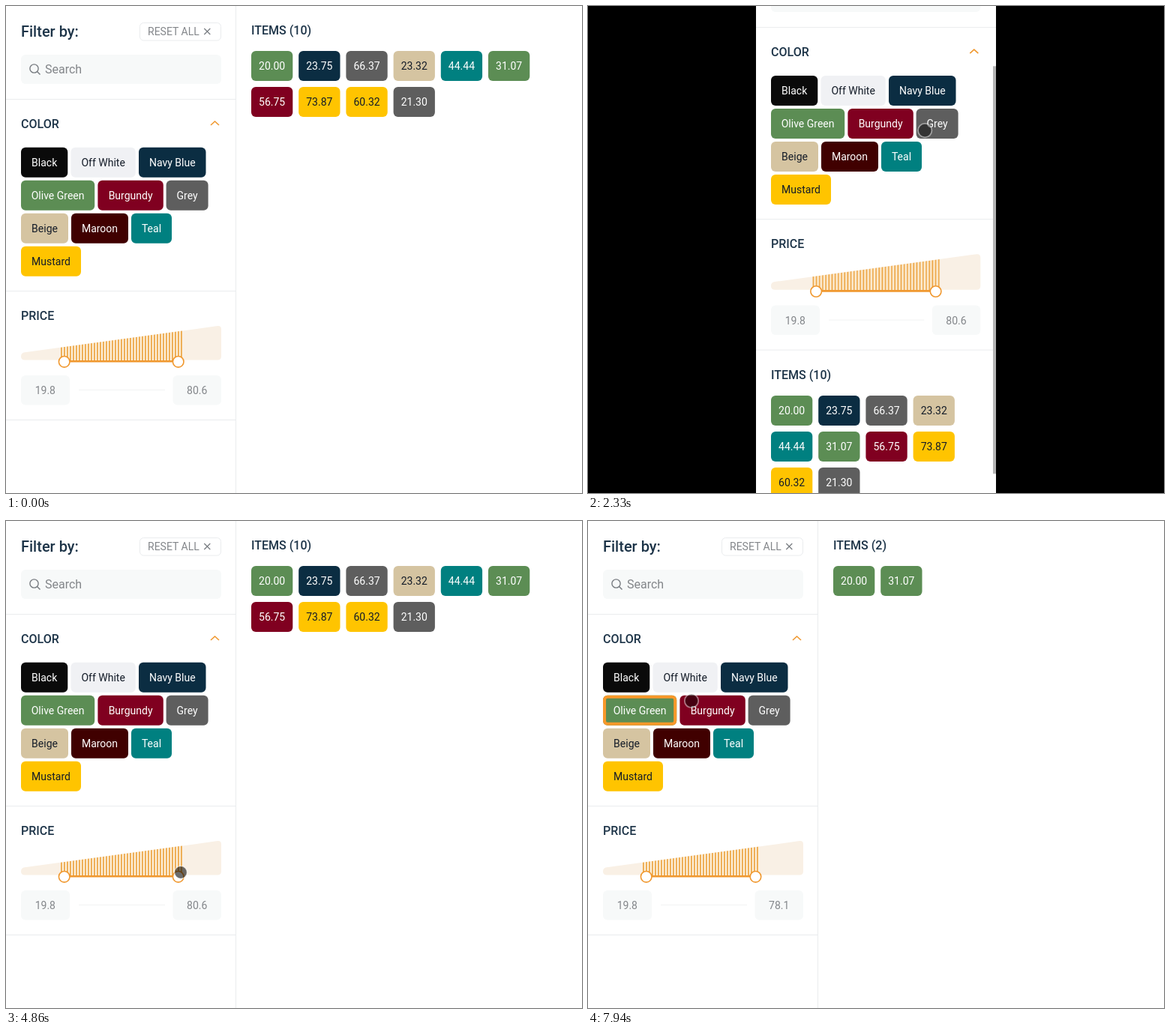
Write an HTML page that moves like this. It is 768 px wide and 650 px high and loops after 8000 ms.

```html
<!DOCTYPE html>
<html lang="en">
<head>
<meta charset="utf-8">
<title>Product filter</title>
<style>
html, body { margin: 0; width: 100%; height: 100%; overflow: hidden; background: #fff; }
svg { display: block; width: 100%; height: 100%; font: 14px Roboto, Arial, sans-serif; }
.head { font-size: 16px; font-weight: 500; fill: #1d3448; }
.title { font-size: 20px; font-weight: 500; fill: #1d3448; }
.soft { fill: #83868a; }
.mid { text-anchor: middle; }
</style>
</head>
<body>
<svg id="stage" viewBox="0 0 768 650">
  <defs>
    <pattern id="bars" width="4" height="50" patternUnits="userSpaceOnUse">
      <rect width="4" height="50" fill="#fdf0da"/>
      <rect x="1" width="1.8" height="50" fill="#eda94c"/>
    </pattern>
  </defs>
  <g id="page"></g>
  <g id="cursor"><circle r="9" fill="#000"/><circle r="9.2" fill="none" stroke="#fff" stroke-opacity=".45" stroke-width="1.8"/></g>
</svg>
<script>
const LOOP = 8000, LOW = 19.8, ORANGE = '#f0982f', RULE = '#eaecee', FIELD = '#f7f9f9';
const TO_MOBILE = 1420, TO_DESKTOP = 3450, GRAB = 5200, DROP = 6960, PICK = 7640;

const colors = {
  Black: '#0a0a0a', 'Off White': '#f0f1f4', 'Navy Blue': '#0b2d42', 'Olive Green': '#5c8d54',
  Burgundy: '#800020', Grey: '#5e5e5e', Beige: '#d5c4a1', Maroon: '#400000', Teal: '#008080', Mustard: '#ffc400'
};
const light = ['Off White', 'Beige', 'Mustard'];

// name, x offset, row, width
const chips = [
  ['Black', 0, 0, 62.3], ['Off White', 66.5, 0, 86.3], ['Navy Blue', 157, 0, 89.5],
  ['Olive Green', 0, 1, 98.2], ['Burgundy', 102.4, 1, 87.4], ['Grey', 193.6, 1, 56],
  ['Beige', 0, 2, 63], ['Maroon', 67, 2, 76], ['Teal', 147, 2, 54],
  ['Mustard', 0, 3, 80]
];

const items = [
  [20, 'Olive Green'], [23.75, 'Navy Blue'], [83.45, 'Mustard'], [66.37, 'Grey'], [23.32, 'Beige'],
  [44.44, 'Teal'], [31.07, 'Olive Green'], [83.42, 'Teal'], [56.75, 'Burgundy'], [73.87, 'Mustard'],
  [60.32, 'Mustard'], [21.3, 'Grey'], [84.9, 'Teal']
];

// time, x, y
const path = [
  [1180, 364, -14], [1290, 361, 2], [1420, 362, -14], [1650, 375, -14], [1880, 450, 260],
  [2140, 450, 262], [2420, 449, 136], [2560, 449, 136], [2800, 447, 270], [3010, 447, 270],
  [3250, 410, -14], [3600, 560, -14], [3840, 552, 97], [4670, 239, 437], [4780, 240, 438],
  [4860, 233, 469], [5040, 229.5, 474], [GRAB, 229.5, 474], [5510, 186, 470], [5620, 186, 470],
  [6390, 258.5, 464], [6560, 258.5, 464], [6920, 223.25, 468], [7000, 223.25, 468],
  [7260, 66, 274], [7370, 66, 274], [7440, 76, 261], [7680, 76, 261], [7920, 138, 240]
];
const scroll = [[2140, 0], [2420, 126], [2560, 126], [2790, 0]];

function sample(keys, t) {
  const n = keys.findIndex(k => k[0] > t);
  if (n < 0) return keys[keys.length - 1].slice(1);
  if (n === 0) return keys[0].slice(1);
  const a = keys[n - 1], b = keys[n];
  let p = (t - a[0]) / (b[0] - a[0]);
  p = p * p * (3 - 2 * p);
  return a.slice(1).map((v, i) => v + (b[i + 1] - v) * p);
}

const rect = (x, y, w, h, fill, extra = '') =>
  `<rect x="${x}" y="${y}" width="${w}" height="${h}" fill="${fill}" ${extra}/>`;
const text = (x, y, s, cls = '', extra = '') =>
  `<text x="${x}" y="${y}" class="${cls}" ${extra}>${s}</text>`;
const line = (d, color, width) =>
  `<path d="${d}" fill="none" stroke="${color}" stroke-width="${width}"/>`;

function tag(x, y, w, label, name) {
  return rect(x, y, w, 40, colors[name], 'rx="6"') +
    text(x + w / 2, y + 25, label, 'mid', `fill="${light.includes(name) ? '#141c28' : '#fff'}"`);
}

function slider(x, w, high) {
  const k = w / 267, step = (w - 17) / 100, bottom = 426.5 + 46 * k;
  const at = v => x + 8.2 + v * step;
  const a = 2.67 * LOW, b = 2.67 * high, top = v => 36.5 - v * .137;
  const y = bottom + 2.3;
  const knob = v => `<circle cx="${at(v)}" cy="${y}" r="7.3" fill="#fff" stroke="${ORANGE}" stroke-width="1.6"/>`;
  return `<g transform="translate(${x} 426.5) scale(${k})">
    <path d="M0 41Q0 36.5 5 35.8L262 .6Q267 0 267 5V41Q267 46 262 46H5Q0 46 0 41Z" fill="#f9f0e5"/>
    <path d="M${a} 47V${top(a)}L${b} ${top(b)}V47Z" fill="url(#bars)"/></g>` +
    line(`M${at(LOW)} ${y - .6}H${at(high)}`, ORANGE, 2.6) + knob(LOW) + knob(high);
}

function filters(x, w, edge, shift, high, picked) {
  const r = x + w, left = x - 20;
  let s = text(x, 41, 'Filter by:', 'title') +
    rect(r - 108.5, 22.5, 108, 23.5, '#fff', `rx="5" stroke="${RULE}"`) +
    text(r - 98, 39, 'RESET ALL', 'soft') +
    line(`M${r - 22.7} 30l8 8m0-8l-8 8`, '#777b80', 1.2) +
    rect(x, 65, w, 39, FIELD, 'rx="6"') +
    `<circle cx="${x + 17.5}" cy="83.5" r="5.6" fill="none" stroke="#777b80" stroke-width="1.4"/>` +
    line(`M${x + 21.5} 87.5l4 4`, '#777b80', 1.4) +
    text(x + 32, 89.7, 'Search', 'soft', 'font-size="16"') +
    text(x, 162.5, 'COLOR', 'head') +
    line(`M${r - 14} 159l5.5-5 5.5 5`, ORANGE, 1.6);
  for (const y of [124.5, 380.5, 552.5 + shift]) s += line(`M${left} ${y}H${edge}`, RULE, 1);
  for (const [name, dx, row, cw] of chips) {
    const cy = 188.8 + row * 44;
    s += tag(x + dx, cy, cw, name, name);
    if (name === picked)
      s += rect(x + dx + 2, cy + 2, cw - 4, 36, 'none', 'rx="4" stroke="#f8982a" stroke-width="4"');
  }
  const fy = 493 + shift;
  return s + text(x, 419, 'PRICE', 'head') + slider(x, w, high) +
    rect(x, fy, 65, 39.5, FIELD, 'rx="6"') + rect(r - 64.5, fy, 64.5, 39.5, FIELD, 'rx="6"') +
    line(`M${x + 77} ${fy + 19.5}H${r - 75}`, '#f2f3f3', 1) +
    text(x + 32.3, fy + 25, LOW.toFixed(1), 'soft mid') +
    text(r - 32.3, fy + 25, high.toFixed(1), 'soft mid');
}

function results(x, y, cols, high, picked) {
  const list = items.filter(([v, c]) => v <= high && (!picked || c === picked));
  return text(x, y, `ITEMS (${list.length})`, 'head') + list.map(([v, c], i) =>
    tag(x + i % cols * 63.2, y + 22.3 + Math.floor(i / cols) * 48, 55.3, v.toFixed(2), c)).join('');
}

const page = document.getElementById('page'), cursor = document.getElementById('cursor');
const disc = cursor.firstElementChild;
let shown = '';

function draw(t) {
  const [cx, cy] = sample(path, t);
  const mobile = t >= TO_MOBILE && t < TO_DESKTOP;
  const high = t < GRAB ? 80.6 : t < DROP ? (cx - 28) / 2.5 : 78.1;
  const picked = t >= PICK ? 'Olive Green' : '';
  let s;
  if (mobile) {
    const [top] = sample(scroll, t);
    s = rect(0, 0, 768, 650, '#000') + rect(224, 0, 320, 650, '#fff') +
      `<g transform="translate(0 ${-top})">` +
      filters(244, 279.3, 544, 2.5, high, '') + results(244, 593.5, 4, high, '') + '</g>';
    if (t > 2150 && t < 2940) s += rect(540, top * 650 / 776, 4, 544, '#b4b4b4');
  } else {
    s = rect(0, 0, 768, 650, '#fff') + line('M306.5 0V650', RULE, 1) +
      filters(20, 267, 306, 0, high, picked) + results(327, 37.7, 6, high, picked);
  }
  if (s !== shown) page.innerHTML = shown = s;

  const pressed = t > 4840 && t < DROP || t >= PICK - 60 && t < PICK + 60;
  cursor.setAttribute('transform', `translate(${cx} ${cy}) scale(${pressed ? .92 : 1})`);
  cursor.setAttribute('visibility', t < 1180 ? 'hidden' : 'visible');
  disc.setAttribute('fill-opacity', pressed ? .58 : .45);
}

const start = performance.now();
function tick() {
  draw((performance.now() - start) % LOOP);
  requestAnimationFrame(tick);
}
tick();
</script>
</body>
</html>
```
